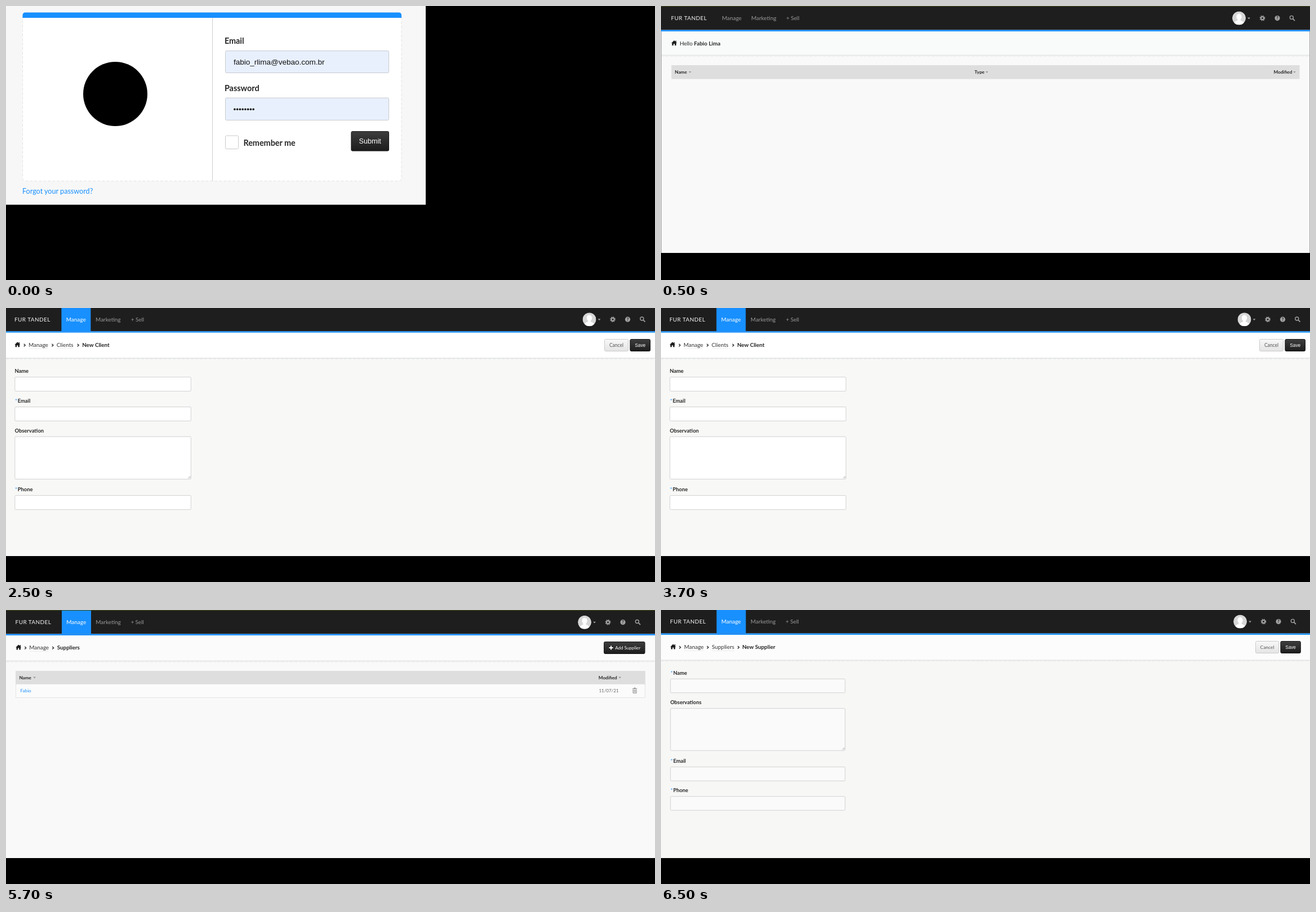
An HTML page that plays this animation: 1152x486 px, repeating every 8 s.

```html
<!DOCTYPE html>
<html lang="en">
<head>
<meta charset="utf-8">
<title>Shop admin tour</title>
<style>
  html, body { margin: 0; width: 100%; height: 100%; overflow: hidden; background: #000; }
  svg { display: block; }
  text { font-family: Lato, sans-serif; white-space: pre; }
  .arial { font-family: "Liberation Sans", Arial, sans-serif; }
  .bold { font-weight: 700; }
</style>
</head>
<body>
<svg id="stage" width="1152" height="486" viewBox="0 0 1152 486">
  <defs>
    <linearGradient id="dark" x2="0" y2="1">
      <stop stop-color="#3d3d3d"/><stop offset="1" stop-color="#1c1c1c"/>
    </linearGradient>
    <linearGradient id="light" x2="0" y2="1">
      <stop stop-color="#f8f8f8"/><stop offset="1" stop-color="#e4e4e4"/>
    </linearGradient>
    <clipPath id="round"><circle r="12"/></clipPath>
    <path id="home" d="M-5 .4 0 -4.5 2.4 -2.2V-4H3.8V-.8L5 .4H3.7V4.4H1.1V1.4H-1.1V4.4H-3.7V.4Z" fill="#1c1c1c"/>
    <path id="chevron" d="M-1.3 -2.3 1.2 0 -1.3 2.3" fill="none" stroke="#222" stroke-width="1.3"/>
    <path id="caret" d="M-2.4 -1.3H2.4L0 1.5Z"/>
    <g id="tools" fill="#a0a0a0">
      <g clip-path="url(#round)">
        <circle r="12" fill="#d6d6d6"/>
        <ellipse cy="-2.4" rx="4.6" ry="5.6" fill="#fff"/>
        <path d="M-9 12C-9 6 -5 5 -2.4 4V1H2.4V4C5 5 9 6 9 12Z" fill="#fff"/>
      </g>
      <use href="#caret" x="17.5" y=".3"/>
      <g transform="translate(41.5 0)">
        <circle r="2.6" fill="none" stroke="#a0a0a0" stroke-width="2.2"/>
        <circle r="4.2" fill="none" stroke="#a0a0a0" stroke-width="1.5" stroke-dasharray="1.65 1.65"/>
      </g>
      <circle cx="68" r="4.6"/>
      <text x="68" y="2.7" font-size="7.5" class="bold" text-anchor="middle" fill="#1e1e1e">?</text>
      <g fill="none" stroke="#a0a0a0">
        <circle cx="93.3" cy="-1.2" r="3" stroke-width="1.4"/>
        <path d="M95.5 1 99 4.5" stroke-width="1.8"/>
      </g>
    </g>
    <g id="trash" fill="none" stroke="#8c8c8c">
      <path d="M-4 -3.5H4M-1.5 -4.6H1.5" stroke-width="1.1"/>
      <path d="M-3 -2.4V4.3H3V-2.4M-1 -2V3M1 -2V3" stroke-width="1"/>
    </g>
  </defs>
</svg>
<script>
const NS = "http://www.w3.org/2000/svg";
const stage = document.getElementById("stage");
const BLUE = "#1890ff", INK = "#262626";
let scene = stage;

function add(tag, attrs, content) {
  const el = document.createElementNS(NS, tag);
  for (const key in attrs) el.setAttribute(key, attrs[key]);
  if (content) el.textContent = content;
  return scene.appendChild(el);
}
const rect = (x, y, right, bottom, fill, more) =>
  add("rect", { x, y, width: right - x, height: bottom - y, fill, ...more });
const box = (x, y, right, bottom, fill, stroke, rx = 2) =>
  rect(x, y, right, bottom, fill, { stroke, rx });
const text = (x, y, size, words, fill = INK, style = "", more) =>
  add("text", { x, y, "font-size": size, fill, class: style, ...more }, words);
const bold = (x, y, size, words) => text(x, y, size, words, INK, "bold");
const icon = (name, x, y, fill) => add("use", { href: "#" + name, x, y, ...(fill && { fill }) });
const path = (d, stroke, more) => add("path", { d, stroke, fill: "none", ...more });

function button(x, y, right, bottom, words, size, dark, style, shift = 0) {
  box(x, y, right, bottom, dark ? "url(#dark)" : "url(#light)", dark ? "#161616" : "#cbcbcb");
  text((x + right) / 2 + shift, (y + bottom) / 2 + size * .34, size, words,
    dark ? "#fff" : "#555", style, { "text-anchor": "middle" });
}

// Top bar, breadcrumb strip and page background shared by the admin screens.
function frame(o) {
  rect(0, 0, 1152, o.bottom, o.page);
  rect(0, 0, 1152, o.bar, "#1e1e1e");
  if (o.active) rect(o.active, 0, o.active + 52, o.bar, BLUE);
  if (o.edge) rect(0, 0, 1152, 1, "#3d4a1a");
  rect(0, o.bar, 1152, o.bar + 2.5, BLUE);
  rect(0, o.bar + 2.5, 1152, o.strip, o.head);
  rect(0, o.strip, 1152, o.strip + 2, "#e7e9e8");
  path(`M0 ${o.strip + 2.5}H1152`, "#e7e9e8", { "stroke-dasharray": "5 3" });
  const [brand, manage, marketing, sell] = o.nav;
  text(brand, o.base, 10, "FUR TANDEL", "#f4f4f4", "", { "letter-spacing": .4 });
  text(manage, o.base, 9.95, "Manage", o.active ? "#fff" : "#999");
  text(marketing, o.base, 9.95, "Marketing", "#999");
  text(sell, o.base, 9.8, "+ Sell", "#999");
  icon("tools", o.tools, o.base - 3.5);
  icon("home", o.home, o.crumb - 4);
}

// Each crumb is [chevron x, text x, words]; the last one is the current page.
function crumbs(base, list) {
  list.forEach(([arrow, x, words], i) => {
    icon("chevron", arrow, base - 2.8);
    if (i === list.length - 1) return bold(x, base, 9.85, words);
    const el = text(x, base, 9.95, words, "#333");
    path(`M${x + .5} ${base + 3.2}H${x + el.getComputedTextLength()}`, "#d8d8d8",
      { "stroke-dasharray": "1 1" });
  });
}

// Each field is [label, label baseline, box top, box height, required].
function form(left, right, fill, size, fields) {
  for (const [label, base, top, height, required] of fields) {
    if (required) text(left + .3, base, size, "*", BLUE);
    bold(left + (required ? 4.9 : -.4), base, size, label);
    const bottom = top + height;
    box(left, top, right, bottom, fill, "#d2d2d2", 1.5);
    if (height > 40)
      path(`M${right - 5} ${bottom - 1.5}l4 -4M${right - 2.7} ${bottom - 1.5}l2 -2`, "#999",
        { "stroke-width": .8 });
  }
}

function column(x, base, words, caretX) {
  bold(x, base, 8.2, words);
  icon("caret", caretX, base - 2.8, "#999");
}

function login() {
  rect(0, 0, 745, 352.5, "#f7f7f7");
  box(29.5, 12, 702, 310.5, "#fff", "#e3e3e3", 5).setAttribute("stroke-dasharray", "5 3");
  add("path", { d: "M29.5 21V16.5Q29.5 11.5 34.5 11.5H697Q702 11.5 702 16.5V21Z", fill: BLUE });
  path("M366.5 21V310", "#cdcdcd");
  add("circle", { cx: 194, cy: 156, r: 57, fill: "#000" });

  bold(387.9, 67, 14.4, "Email");
  box(389.5, 79.5, 679.5, 118.5, "#e8f0fe", "#c6cad0");
  text(404, 104, 13.5, "fabio_rlima@vebao.com.br", "#111", "arial");
  bold(387.9, 150.5, 14.4, "Password");
  box(389.5, 163, 679.5, 202.5, "#e8f0fe", "#c6cad0");
  text(403.6, 188, 13.5, "•".repeat(8), "#111", "arial");
  box(389.5, 230, 412.5, 253.5, "#fff", "#cacaca");
  bold(421.4, 248, 14.4, "Remember me");
  button(612.9, 222.5, 679.5, 257, "Submit", 12.6, true, "arial");
  text(29, 333, 12.6, "Forgot your password?", BLUE);
}

function welcome() {
  frame({ bottom: 438, page: "#f9f9f9", head: "#f9fbfa", bar: 42.5, strip: 86.5, edge: true,
    nav: [17.8, 108.2, 160.2, 222.2], base: 25.1, tools: 1026, home: 23.3, crumb: 69.5 });
  text(33.2, 69.5, 9.9, "Hello ").append(
    Object.assign(document.createElementNS(NS, "tspan"), { textContent: "Fabio Lima" }));
  scene.lastChild.lastChild.setAttribute("class", "bold");
  rect(18.5, 105, 1133.5, 129.5, "#dedede");
  column(24.5, 120, "Name", 51.5);
  column(556.6, 120, "Type", 578.5);
  column(1087.4, 120, "Modified", 1124.5);
  path("M.5 45V438M1151.5 45V438", "#a5a5a5");
}

function newClient() {
  frame({ bottom: 440, page: "#f8f8f7", head: "#fff", bar: 41.3, strip: 88, active: 98.4,
    nav: [15, 106.8, 159.1, 221.8], base: 23.7, tools: 1035.5, home: 20.3, crumb: 68.8 });
  crumbs(68.8, [[33, 39.9, "Manage"], [82.7, 89.7, "Clients"], [128, 135.2, "New Client"]]);
  button(1062.5, 55.5, 1104.5, 76.5, "Cancel", 8.5);
  button(1107.9, 55.5, 1143.5, 76.5, "Save", 8.3, true, "arial");
  form(15.8, 328.3, "#fff", 9.4, [
    ["Name", 115, 122.5, 25],
    ["Email", 167.7, 175.4, 25, true],
    ["Observation", 220.5, 228.2, 75.3],
    ["Phone", 325.2, 332.6, 25, true]
  ]);
}

function suppliers() {
  frame({ bottom: 440, page: "#f9f9f9", head: "#fbfbfb", bar: 42.5, strip: 89.5, edge: true,
    active: 99, nav: [16.6, 107.3, 159.3, 221.4], base: 25.2, tools: 1027, home: 22.2, crumb: 70 });
  crumbs(70, [[34.5, 41.2, "Manage"], [83.5, 90.7, "Suppliers"]]);
  button(1061.5, 56.5, 1134, 77.5, "Add Supplier", 8, true, "", 6);
  path("M1070.5 67H1077.5M1074 63.5V70.5", "#fff", { "stroke-width": 1.9 });
  rect(17.5, 131, 1134.3, 155.5, "#fbfbfb", { stroke: "#e4e4e4" });
  rect(17, 108, 1134.8, 131.5, "#dedede");
  column(23.4, 122.7, "Name", 50.5);
  column(1051.8, 122.7, "Modified", 1089.7);
  text(25.6, 146.1, 8.1, "Fabio", BLUE);
  text(1052.4, 146.1, 8, "11/07/21", "#666");
  icon("trash", 1116, 143);
}

function newSupplier() {
  frame({ bottom: 440, page: "#f7f7f6", head: "#fcfcfc", bar: 41.5, strip: 88.2, active: 98.6,
    nav: [16.1, 107, 159, 221.3], base: 24.1, tools: 1028, home: 21.5, crumb: 69 });
  crumbs(69, [[33.7, 40.9, "Manage"], [83, 90.2, "Suppliers"], [137.5, 144.2, "New Supplier"]]);
  button(1055.5, 55.5, 1096.5, 76.5, "Cancel", 8.4);
  button(1099.9, 55.5, 1135.3, 76.5, "Save", 8.2, true, "arial");
  form(16.8, 326.8, "#fafafa", 9.3, [
    ["Name", 114.8, 122.2, 24.6, true],
    ["Observations", 167.1, 174.6, 74.7],
    ["Email", 270.8, 278.3, 24.8, true],
    ["Phone", 323.3, 330.7, 24.6, true]
  ]);
}

const LOOP = 8000;
const steps = [[0, login], [500, welcome], [2500, newClient], [4500, suppliers], [6500, newSupplier]]
  .map(([start, draw]) => {
    scene = stage;
    scene = add("g");
    draw();
    return { start, group: scene };
  });

function show() {
  const time = performance.now() % LOOP;
  const current = steps.findLast(step => step.start <= time);
  for (const step of steps)
    step.group.style.display = step === current ? "" : "none";
  requestAnimationFrame(show);
}
show();
</script>
</body>
</html>
```
